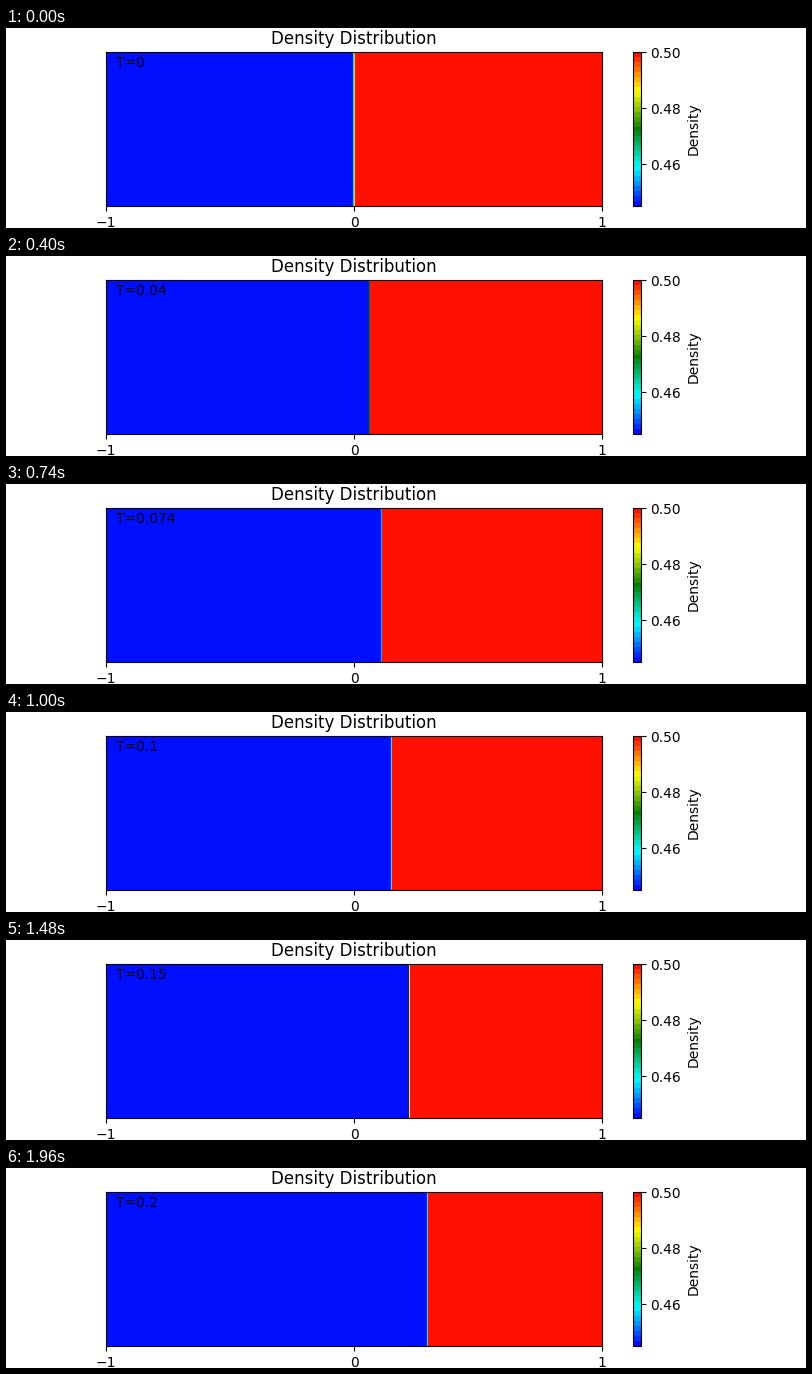
Animation of 800x200 px, one loop 2 s. Source, as a matplotlib script:

```python
import numpy as np
import matplotlib.pyplot as plt
from matplotlib.animation import FuncAnimation
from matplotlib.colors import LinearSegmentedColormap

FRAMES, INTERVAL = 100, 20
DT = 0.002
SPEED = 1.52
LEFT, RIGHT = 0.445, 0.5

x = np.linspace(-1, 1, 401)
y = np.array([0, 1])
levels = np.linspace(LEFT, RIGHT, 32)
cmap = LinearSegmentedColormap.from_list(
    "density", ["blue", "cyan", "green", "yellow", "red"])

fig, ax = plt.subplots(figsize=(8, 2), dpi=100)


def density(t):
    """Step profile moving right; the node on the step takes the mean."""
    step = np.heaviside(np.round(x - SPEED * t, 9), 0.5)
    return np.tile(LEFT + (RIGHT - LEFT) * step, (2, 1))


def draw_field(t):
    return ax.contourf(x, y, density(t), levels=levels, cmap=cmap)


field = draw_field(0)
fig.colorbar(field, ax=ax, label="Density", ticks=[0.46, 0.48, 0.5],
             format="%.2f")
ax.set(title="Density Distribution", xticks=[-1, 0, 1], yticks=[])
label = ax.text(0.02, 0.9, "T=0", transform=ax.transAxes)


def update(i):
    global field
    t = i * DT
    field.remove()
    field = draw_field(t)
    label.set_text(f"T={t:.2g}")
    return field, label


anim = FuncAnimation(fig, update, frames=FRAMES, interval=INTERVAL,
                     repeat=True, repeat_delay=0)
plt.show()
```
